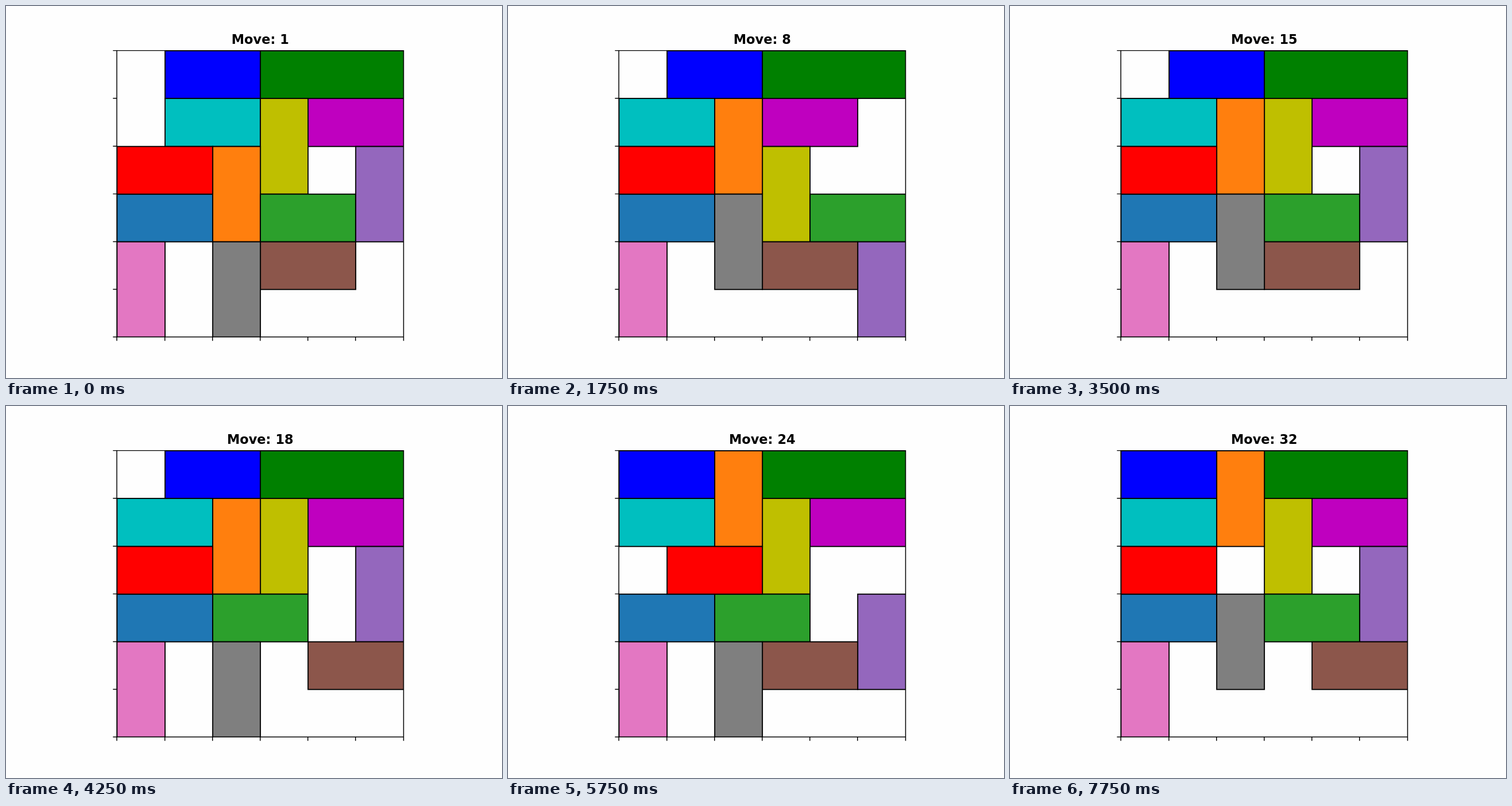
Animation, 864 px wide and 648 px high, one loop 8 s. Source, as an HTML page:

```html
<!DOCTYPE html>
<html lang="en">
<head>
<meta charset="utf-8">
<title>Sliding blocks</title>
<style>
  html, body { margin: 0; width: 100%; height: 100%; overflow: hidden; background: #fefefe; }
  svg { display: block; }
  text { font: bold 33.333px "DejaVu Sans", sans-serif; text-anchor: middle; }
</style>
</head>
<body>
<svg id="stage" width="864" height="648" viewBox="0 0 1280 960">
  <clipPath id="board"><rect x="286" y="115" width="740" height="739"/></clipPath>
  <g clip-path="url(#board)">
    <g id="blocks" transform="translate(.5 .5)" stroke="#000" stroke-width="2.78"></g>
  </g>
  <path id="axes" fill="none" stroke="#000" stroke-width="2.22"/>
  <text id="title" x="656" y="98.5"></text>
</svg>
<script>
const STEP = 250;
const CELL = 123.2;
const px = c => Math.round(286.4 + c * CELL);
const py = r => Math.round(115.2 + r * CELL);

// key: [column, row, width, height, colour]
const blocks = {
  B: [1, 0, 2, 1, '#0000ff'],
  G: [3, 0, 3, 1, '#008000'],
  C: [1, 1, 2, 1, '#00bfbf'],
  M: [4, 1, 2, 1, '#bf00bf'],
  Y: [3, 1, 1, 2, '#bfbf00'],
  S: [0, 3, 2, 1, '#1f77b4'],
  O: [2, 2, 1, 2, '#ff7f0e'],
  L: [3, 3, 2, 1, '#2ca02c'],
  P: [5, 2, 1, 2, '#9467bd'],
  N: [3, 4, 2, 1, '#8c564b'],
  K: [0, 4, 1, 2, '#e377c2'],
  A: [2, 4, 1, 2, '#7f7f7f'],
  R: [0, 2, 2, 1, '#ff0000']
};

// each move: block key and its new column (wide blocks) or row (tall blocks)
const moves = ('P4 L4 Y2 M3 C0 O1 A3 M4 Y1 A4 L3 P3 A3 P2 N4 A4 ' +
  'L2 N3 B0 P4 O0 R1 P3 L3 R0 A3 P4 R1 P2 N4 R0').split(' ');

const $ = id => document.getElementById(id);
const rects = {};

function setAttrs(el, attrs) {
  for (const k in attrs) el.setAttribute(k, attrs[k]);
}

for (const key in blocks) {
  const rect = document.createElementNS('http://www.w3.org/2000/svg', 'rect');
  rect.setAttribute('fill', blocks[key][4]);
  rects[key] = $('blocks').appendChild(rect);
}

let axes = `M${px(0)} ${py(0)}H${px(6)}V${py(6)}H${px(0)}Z`;
for (let i = 0; i <= 6; i++) {
  axes += `M${px(i)} ${py(6)}v10M${px(0)} ${py(i)}h-10`;
}
$('axes').setAttribute('d', axes);

function layout(count) {
  const pos = {};
  for (const key in blocks) pos[key] = blocks[key].slice(0, 2);
  for (const [key, to] of moves.slice(0, count)) {
    const wide = blocks[key][2] > 1;
    pos[key][wide ? 0 : 1] = +to;
  }
  return pos;
}

function render(count) {
  const pos = layout(count);
  for (const key in pos) {
    const [c, r] = pos[key], [, , w, h] = blocks[key];
    setAttrs(rects[key], {
      x: px(c), y: py(r),
      width: px(c + w) - px(c), height: py(r + h) - py(r)
    });
  }
  $('title').textContent = 'Move: ' + (count + 1);
}

const start = performance.now();
let shown = -1;

function tick() {
  const elapsed = Math.max(0, performance.now() - start);
  const count = Math.floor(elapsed / STEP) % (moves.length + 1);
  if (count !== shown) render(shown = count);
  requestAnimationFrame(tick);
}
tick();
</script>
</body>
</html>
```
